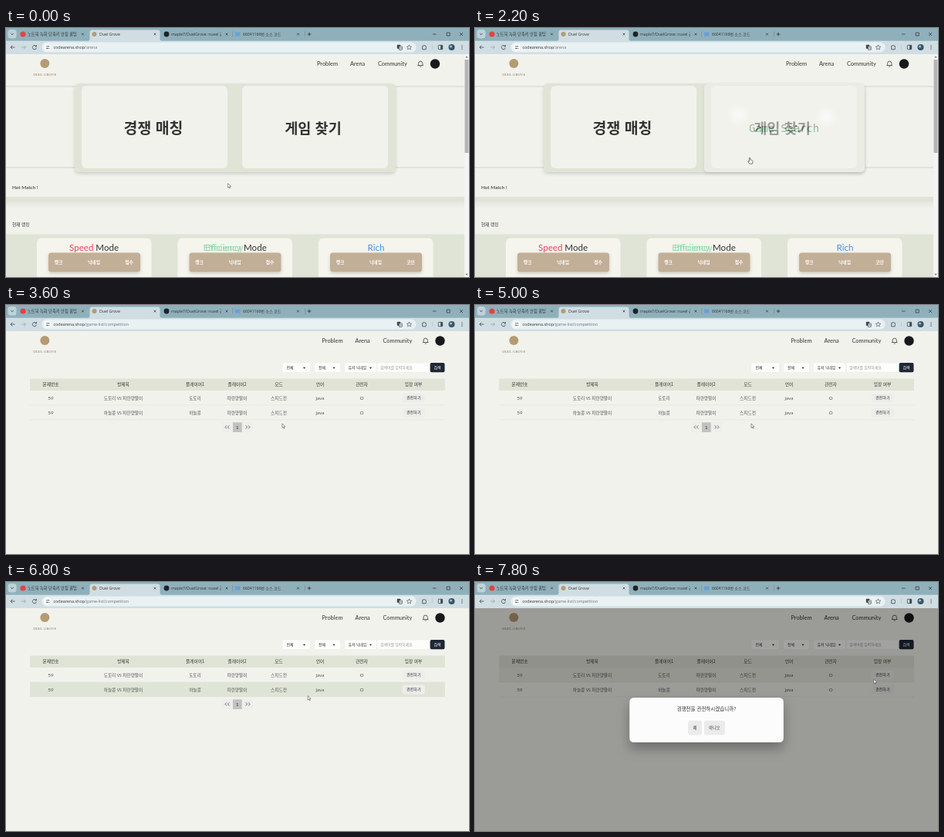
An HTML page that plays this animation: 600x323 px, repeating every 8000 ms.

```html
<!DOCTYPE html>
<html lang="ko">
<head>
<meta charset="utf-8">
<title>Duel Grove</title>
<style>
html, body { margin: 0; width: 100%; height: 100%; overflow: hidden; background: #f2f2ed; }
svg { display: block; width: 100%; height: 100%; }
text { font-family: 'Noto Sans CJK KR', 'Noto Sans CJK', 'Noto Sans CJK JP', sans-serif; fill: #333; white-space: pre; }
.ui { font-family: 'Open Sans', 'Noto Sans CJK KR', 'Noto Sans CJK', sans-serif; }
.geo { font-family: Lato, 'Noto Sans CJK KR', 'Noto Sans CJK', sans-serif; }
.serif { font-family: 'Liberation Serif', serif; }
.mono { font-family: 'DejaVu Sans Mono', monospace; }
</style>
</head>
<body>
<svg id="stage" viewBox="0 0 600 323" preserveAspectRatio="none"></svg>
<script>
const LOOP = 8000, PAGE_AT = 3400, MODAL_AT = 7700;
const BG = '#f2f2ed', SAGE = '#e0e4d6', INK = '#2b2b2b';

const rect = (x, y, w, h, fill, r = 0, more = '') =>
  `<rect x="${x}" y="${y}" width="${w}" height="${h}" rx="${r}" fill="${fill}" ${more}/>`;
const circle = (x, y, r, fill, more = '') =>
  `<circle cx="${x}" cy="${y}" r="${r}" fill="${fill}" ${more}/>`;
const line = (d, color = INK, w = 0.7, more = '') =>
  `<path d="${d}" fill="none" stroke="${color}" stroke-width="${w}" ${more}/>`;
const text = (s, x, y, size, more = '', cls = '') =>
  `<text x="${x}" y="${y}" font-size="${size}" class="${cls}" ${more}>${s}</text>`;
const mid = (s, x, y, size, more = '', cls = '') =>
  text(s, x, y, size, 'text-anchor="middle" ' + more, cls);
const group = (id, body, more = '') => `<g id="${id}" ${more}>${body}</g>`;
const fill = c => `style="fill:${c}"`;

const defs = `<defs>
  <filter id="soft" x="-20%" y="-20%" width="140%" height="150%">
    <feDropShadow dx="0" dy="2" stdDeviation="2" flood-opacity=".16"/></filter>
  <filter id="deep" x="-30%" y="-30%" width="160%" height="220%">
    <feDropShadow dx="0" dy="8" stdDeviation="8" flood-opacity=".3"/></filter>
  <radialGradient id="glow"><stop offset=".15" stop-color="#fff"/>
    <stop offset="1" stop-color="#fff" stop-opacity="0"/></radialGradient>
  <linearGradient id="fade" x1="0" y1="0" x2="0" y2="1"><stop offset="0" stop-color="#000" stop-opacity=".1"/>
    <stop offset="1" stop-color="#000" stop-opacity="0"/></linearGradient>
  <linearGradient id="leaf" x1="0" y1="0" x2="0" y2="1"><stop offset=".25" stop-color="#7d6a4c"/>
    <stop offset=".6" stop-color="#3f9a55"/></linearGradient>
  <clipPath id="tab1"><rect x="28" width="65" height="16"/></clipPath>
  <clipPath id="tab3"><rect x="214" width="65" height="16"/></clipPath>
</defs>`;

const cross = (x, y, r = 1.4) =>
  line(`M${x - r} ${y - r}l${2 * r} ${2 * r}m0 ${-2 * r}l${-2 * r} ${2 * r}`, '#26343a', 0.7);

function browser() {
  const dark = '#3a464b';
  return rect(0, 0, 600, 34, '#8fb0bb') +
    rect(2.5, 2, 11, 11.5, '#bdd2d9', 3.5) + line('M6.3 7l1.7 1.7l1.7-1.7', INK, 0.8) +
    '<path d="M105.500 17q3 0 3-3V5.500q0-3 3-3h85q3 0 3 3v8.500q0 3 3 3z" fill="#d0dee3"/>' +
    rect(0, 16.7, 600, 17.3, '#d0dee3') +
    circle(22, 8, 3.6, '#e04444') +
    text('노트북 녹화 단축키 안됨 꿀팁', 28, 10, 5.25, 'clip-path="url(#tab1)"') + cross(99.5, 8) +
    circle(114.5, 8, 3, '#b59b73') + text('Duel Grove', 121, 10, 5.2, '', 'ui') + cross(193, 8) +
    circle(208, 8, 3.4, '#1d2327') +
    text('maple7/DuelGrove: nuvel 공통', 214, 10, 5.2, 'clip-path="url(#tab3)"', 'ui') + cross(286, 8) +
    line('M293.500 4.500v7M387.500 4.500v7', '#6b8b96', 0.6) +
    rect(297, 5.5, 6.5, 5, '#6a9fd8') + text('66041166번 소스 코드', 307, 10, 5.1, '', 'ui') + cross(378.5, 8) +
    line('M390.700 8h4.600M393 5.700v4.600', INK, 0.8) +
    line('M553 8h4.500', INK, 0.7) + line('M571.200 6h4v4h-4z', INK, 0.7) + cross(590, 8, 2) +
    line('M11.500 25h-5.500m2.400-2.400l-2.400 2.400l2.400 2.400', dark, 0.8) +
    line('M20 25h5.500m-2.400-2.400l2.400 2.400l-2.400 2.400', '#94a5ab', 0.8) +
    line('M39 23.500a2.600 2.600 0 1 0 .5 2.200M39.400 22v2h-2', dark, 0.8) +
    rect(46.5, 18.5, 485, 13, '#eaf1f3', 6.5) + circle(54, 25, 4.6, '#fff') +
    line('M51.700 23.700h2.300m2 0h.5M51.700 26.400h.5m2 0h2.300', dark, 0.7) +
    circle(55, 23.7, 0.8, dark) + circle(53.2, 26.4, 0.8, dark) +
    `<text x="61.500" y="27" font-size="5.4" class="ui">codearena.shop<tspan id="path" style="fill:#68757a"></tspan></text>` +
    rect(506.8, 21.8, 4.4, 5, dark, 0.6) +
    rect(509.3, 23.8, 4, 4.6, '#eaf1f3', 0.6, `stroke="${dark}" stroke-width=".7"`) +
    line('M510.400 27.200l1-2.200l1 2.200', dark, 0.5) +
    line('M522.500 21.900l.9 2.100l2.300.2l-1.700 1.500l.5 2.200l-2-1.200l-2 1.200l.5-2.200l-1.700-1.500l2.300-.2z', dark, 0.6) +
    line('M539.700 23.200h1.400q.8-2 1.600 0h1.400v1.400q1.800.8 0 1.600v1.600h-4.400z', dark, 0.8) +
    line('M552.500 22v6', '#a9bfc6', 0.6) +
    rect(560.3, 22.3, 5.4, 5.4, 'none', 0.6, `stroke="${dark}" stroke-width=".8"`) + rect(563.2, 22.3, 2.5, 5.4, dark) +
    circle(577.5, 25, 4, '#35566a') + circle(576.6, 24, 1.6, '#a6bdc8') +
    [22.8, 25, 27.2].map(y => circle(591, y, 0.65, dark)).join('');
}

// dx shifts the right-hand items when there is no scrollbar
const header = dx =>
  circle(50.3, 46, 6, '#b59b73') + mid('DUEL GROVE', 50.3, 62.2, 4.8, fill('#8f7d60'), 'serif') +
  text('Problem', 403 + dx, 48.7, 7.4, '', 'geo') + text('Arena', 446 + dx, 48.7, 7.4, '', 'geo') +
  text('Community', 482 + dx, 48.7, 7.4, '', 'geo') +
  line(`M${533.7 + dx} 48.500q1-.8 1-3q0-2.400 2.500-2.400q2.500 0 2.500 2.400q0 2.200 1 3zM${536.2 + dx} 49.800q1 1 2 0`, INK, 0.75) +
  circle(556 + dx, 46.5, 6.2, '#17181c');

const modeCard = (x, title, last) =>
  rect(x, 272.5, 148.5, 60, '#f5f4ed', 6) + title +
  rect(x + 15, 291.5, 119, 25, '#c2af97', 3.5, 'filter="url(#soft)"') +
  [['랭크', 28], ['닉네임', 74], [last, 119.5]].map(([s, dx]) =>
    mid(s, x + dx, 306, 5.8, 'font-weight="700" ' + fill('#fff'))).join('');

const twoTone = (x, a, color, b) =>
  `<text x="${x}" y="289" font-size="11.6" class="geo"><tspan style="fill:${color}">${a}</tspan>${b}</text>`;
const ghost = id =>
  text('Efficiency', 256, 289, 11.6, `id="${id}" ${fill('#93dba8')}`, 'geo');

function arena() {
  const box = rect(89, 72, 416, 115, SAGE, 6, 'filter="url(#soft)"') +
    rect(98, 75, 189, 107, BG, 6) + rect(306, 75, 189, 107, BG, 6) +
    mid('경쟁 매칭', 191, 136.5, 19.4, 'font-weight="700"') +
    mid('게임 찾기', 398, 136.5, 18.6, 'font-weight="700"');
  const hover = rect(297, 72, 208, 115, BG, 5, 'filter="url(#soft)"') +
    circle(341, 113, 15, 'url(#glow)') + circle(455, 116, 15, 'url(#glow)') +
    mid('Game Search', 400.5, 134.5, 13.75, fill('url(#leaf)'), 'mono');
  return rect(0, 34, 600, 289, BG) + header(0) +
    rect(0, 75, 594, 1.6, '#dcdfd8') + rect(0, 180.2, 594, 1.6, '#dcdfd8') +
    box + group('hover', hover) +
    text('Hot Match !', 8, 209.3, 6.4, 'font-weight="500"', 'geo') +
    rect(0, 219, 594, 6, SAGE) + rect(0, 225, 594, 9, 'url(#fade)', 0, 'opacity=".55"') +
    text('현재 랭킹', 8, 257.3, 5.7, 'font-weight="500"') +
    rect(0, 267.5, 594, 56, SAGE) +
    modeCard(40, twoTone(82, 'Speed', '#e5455a', ' Mode'), '점수') +
    modeCard(222.5, ghost('ghostA') + ghost('ghostB') + text('Mode', 308, 289, 11.6, '', 'geo'), '점수') +
    modeCard(405, twoTone(468.5, 'Rich', '#4b8fdc', ''), '코인') +
    rect(594, 34, 6, 289, '#f4f4f4') + rect(594.5, 41, 5, 121, '#b4b4b4') +
    '<path d="M595.300 38.500h3.400l-1.700-2.200zM595.300 318.800h3.400l-1.700 2.200z" fill="#777"/>';
}

const COLS = [58, 152, 245, 299.5, 353.5, 407, 461, 528];
function row(i, y, name) {
  const cells = ['59', `${name} vs 파란양말이`, name, '파란양말이', '스피드전', 'java', 'O'];
  return rect(31, y, 538, 19, SAGE, 0, `id="row${i}"`) +
    rect(31, y + 18.6, 538, 0.6, '#dfdfd9') +
    cells.map((s, k) => /^\w+$/.test(s)
      ? mid(s, COLS[k], y + 11.7, 6.4, fill('#555'), 'geo')
      : mid(s, COLS[k], y + 11.5, 5.7, fill('#555'))).join('') +
    rect(513.5, y + 3.5, 29.5, 12, '#ededec', 2.5, `id="watch${i}"`) +
    mid('관전하기', 528.3, y + 11.2, 5.1, 'font-weight="500"');
}

function select(x, w, s, tx, caret) {
  return rect(x, 75, w, 12.5, '#fdfdfc', 2, 'stroke="#e8e8e4" stroke-width=".5"') +
    text(s, tx, 83.2, 4.9) + `<path d="M${caret - 1.6} 80.700h3.200l-1.600 2z" fill="#222"/>`;
}

function list() {
  const heads = ['문제번호', '방제목', '플레이어1', '플레이어2', '모드', '언어', '관전자', '입장 여부'];
  const arrows = (x, d) => line(`M${x} 156.400l${d} 2l${-d} 2m3.300-4l${d} 2l${-d} 2`, '#333', 0.7);
  return rect(0, 34, 600, 289, BG) + header(6.5) +
    select(358, 36.5, '전체', 363.5, 386.5) + select(399.5, 34, '전체', 405, 425) +
    select(438.5, 42, '유저 닉네임', 443.5, 472.5) +
    rect(481, 75, 69, 12.5, '#fdfdfc', 0, 'stroke="#e8e8e4" stroke-width=".5"') +
    text('검색어를 입력하세요.', 485, 83.1, 4.9, fill('#999')) +
    rect(549.6, 75, 18.9, 12.3, '#1f2735', 2) +
    mid('검색', 559, 83.1, 5, 'font-weight="500" ' + fill('#fff')) +
    rect(31, 95.5, 538, 15.5, SAGE, 1.5) +
    heads.map((s, k) => mid(s, COLS[k], 105.4, 5.7, 'font-weight="500"')).join('') +
    row(0, 111, '도토리') + row(1, 130, '하늘콩') +
    rect(280, 152.3, 40, 12.7, '#eeeeea', 1.5) + rect(294, 152.3, 11.7, 12.7, '#c3c2c0') +
    arrows(286, -2) + mid('1', 299.9, 160.7, 6.2, '', 'geo') + arrows(310.7, 2);
}

function modal() {
  return rect(0, 34, 600, 289, '#000', 0, 'opacity=".36"') +
    rect(200.3, 150, 199.5, 58, '#fdfcfd', 5.5, 'filter="url(#deep)"') +
    mid('경쟁전을 관전하시겠습니까?', 300, 167, 6.5) +
    rect(276, 179.7, 18, 18.8, '#ebebeb', 3) + rect(297, 179.7, 27, 18.8, '#ebebeb', 3) +
    mid('예', 285, 190.8, 5.2, 'font-weight="500"') + mid('아니오', 310.5, 190.8, 5.2, 'font-weight="500"');
}

const pointers =
  group('arrow', '<path d="M0 0v5.400l1.300-1.100l.9 2l.8-.4l-.9-1.900l1.700-.2z" fill="#fff" stroke="#333" stroke-width=".5"/>') +
  group('hand', '<path d="M-.7.600q.7-1.200 1.400 0v2.400q2.800.2 3.200 1.400q.2 2-.7 3.800h-3.400l-2.200-3q0-1.100 1.700.1z" fill="#fff" stroke="#222" stroke-width=".6"/>');

document.getElementById('stage').innerHTML = defs +
  group('arena', arena()) + group('list', list()) + group('modal', modal()) + browser() + pointers;

const el = id => document.getElementById(id);
const show = (id, on) => el(id).setAttribute('visibility', on ? 'visible' : 'hidden');
const clamp = v => Math.max(0, Math.min(1, v));

// time, x, y of the pointer tip
const TRACK = [[0, 287.7, 201.7], [700, 287.7, 201.7], [1400, 327.7, 212], [1900, 350, 190],
  [2400, 360, 153.5], [3400, 360, 153.5], [3401, 358, 153.9], [6650, 358, 153.9],
  [7450, 534, 120.5], [7620, 534, 120.5], [7780, 516.8, 126.3], [8000, 516.8, 126.3]];

function pointer(t) {
  const i = Math.max(1, TRACK.findIndex(k => k[0] > t));
  const [a, b] = [TRACK[i - 1], TRACK[i]];
  const f = clamp((t - a[0]) / (b[0] - a[0]));
  return [a[1] + (b[1] - a[1]) * f, a[2] + (b[2] - a[2]) * f];
}

function draw(t) {
  const [x, y] = pointer(t);
  const onList = t >= PAGE_AT, asked = t >= MODAL_AT;
  show('arena', !onList);
  show('list', onList);
  show('modal', asked);
  el('path').textContent = onList ? '/game-list/competition' : '/arena';
  el('hover').setAttribute('opacity', clamp((t - 1950) / 450));

  // the green title flickers between two loose copies
  const beat = Math.floor(t / 200);
  el('ghostA').setAttribute('x', 255.6 + 0.4 * Math.sin(beat * 2.1));
  el('ghostB').setAttribute('x', 257.8 + 0.5 * Math.cos(beat * 1.7));

  let overButton = false;
  [111, 130].forEach((top, i) => {
    const inRow = onList && y >= top && y < top + 19;
    const inBtn = inRow && !asked && x > 513.5 && x < 543 && y > top + 3.5 && y < top + 15.5;
    overButton = overButton || inBtn;
    el('row' + i).setAttribute('opacity', inRow ? (asked ? 0.6 : 1) : 0);
    el('watch' + i).setAttribute('fill', inBtn ? '#cfcdd0' : '#ededec');
  });

  const hand = overButton || (!onList && y < 187);
  show('hand', hand);
  show('arrow', !hand);
  for (const id of ['hand', 'arrow']) el(id).setAttribute('transform', `translate(${x} ${y})`);
}

const start = performance.now();
function tick() {
  draw((performance.now() - start) % LOOP);
  requestAnimationFrame(tick);
}
tick();
</script>
</body>
</html>
```
